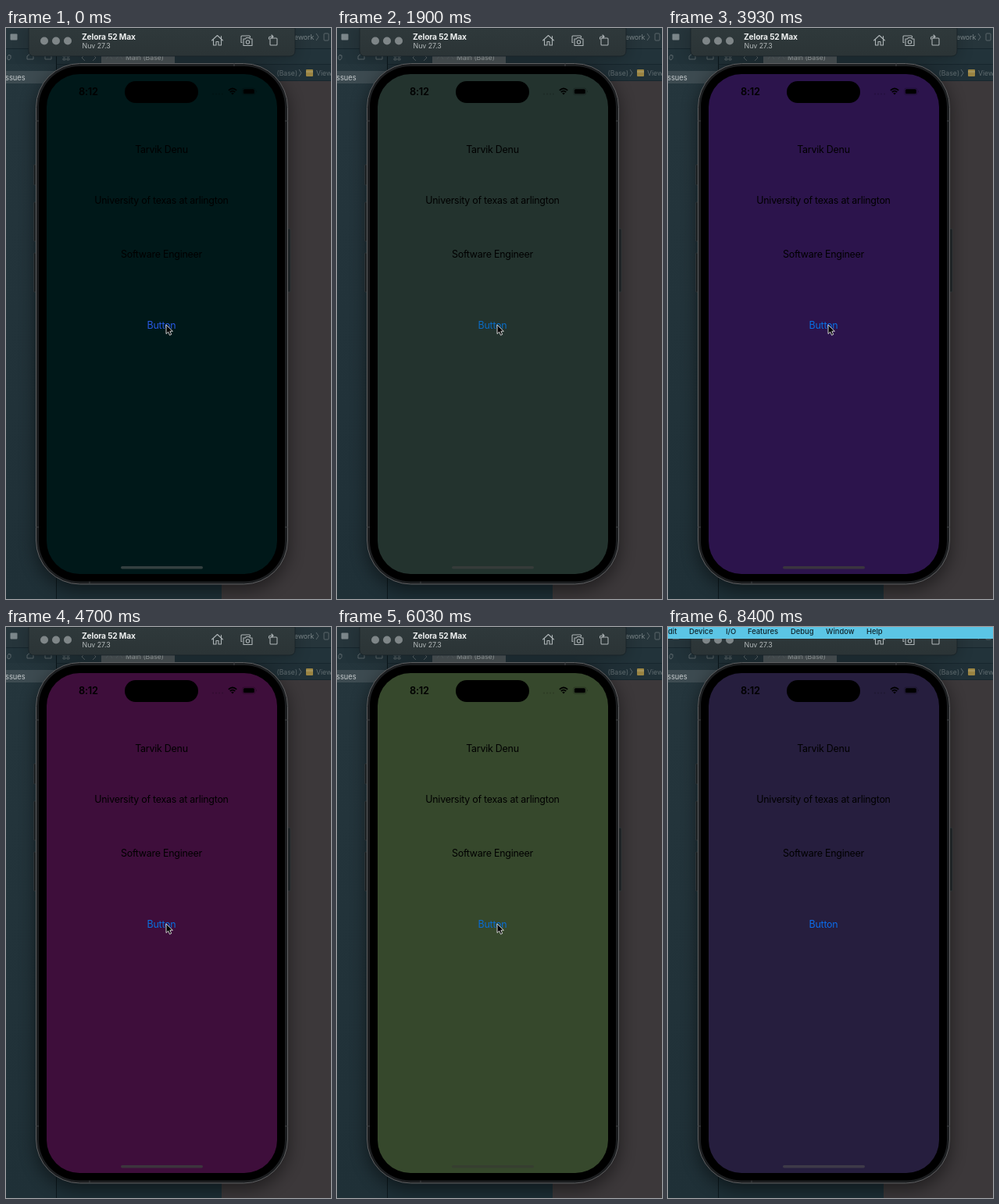
An HTML page for the animation above (8430 ms loop, 416 by 731 pixels).

```html
<!DOCTYPE html>
<html lang="en">
<head>
<meta charset="utf-8">
<title>Colour changing phone screen</title>
<style>
  html, body { margin: 0; width: 100%; height: 100%; overflow: hidden; background: #1a292f; }
  svg { display: block; width: 100vw; height: 100vh; }
  text { font-family: Inter, "Open Sans", Arial, sans-serif; }
  .label { font-size: 12.4px; letter-spacing: -.22px; text-anchor: middle; }
  .ide { font-size: 8.7px; fill: #5f6b6f; }
  .menu { font-size: 9.4px; font-weight: 500; fill: #10242b; }
  .line { fill: none; stroke: #adb4b6; stroke-width: 1.1; stroke-linejoin: round; stroke-linecap: round; }
  .dim { fill: none; stroke: #5b676b; stroke-width: 1; }
</style>
</head>
<body>
<svg viewBox="0 0 416 731" preserveAspectRatio="none">
  <defs>
    <linearGradient id="left" x2="0" y2="1">
      <stop offset="0" stop-color="#25363d"/><stop offset="1" stop-color="#1f3037"/>
    </linearGradient>
    <linearGradient id="bar" x2="0" y2="1">
      <stop offset="0" stop-color="#2f393b"/><stop offset="1" stop-color="#2b3436"/>
    </linearGradient>
    <filter id="blur" x="-20%" y="-80%" width="140%" height="260%">
      <feGaussianBlur stdDeviation="11"/>
    </filter>
  </defs>

  <!-- editor behind the simulator -->
  <rect width="416" height="731" fill="#1d2f36"/>
  <rect width="64" height="731" fill="url(#left)"/>
  <rect x="276" y="67" width="140" height="664" fill="#3c383a"/>
  <rect width="416" height="26" fill="#26353b"/>
  <rect y="26" width="416" height="20" fill="#22333a"/>
  <rect x="65" y="46" width="351" height="21" fill="#203037"/>
  <path d="M0 26.500H416M65 46.500H416M65 67.500H416" stroke="#17262d"/>
  <path d="M64.500 26V731" stroke="#0c181d"/>
  <rect y="55" width="64" height="16" fill="#3d4b51"/>
  <text x="-1" y="66.500" font-size="9.300" fill="#c5cacc">ssues</text>
  <rect x="122" y="30" width="94" height="15" fill="#50595c"/>
  <text x="153" y="40.500" class="ide" style="fill:#a9b1b3">Main (Base)</text>
  <path class="dim" d="M128 40l4-6 4 6M141 40l4-6 4 6"/>
  <rect x="5.500" y="7.500" width="9" height="8" rx="1" fill="#7c878b"/>
  <path class="dim" d="M2 40q-1-4 2-6q0 2 2 1q1 4-2 6zM27 40v-4l4-3 4 3v4zM50 34h8v6h-8zM73 34h3v3h-3zM78 34h3v3h-3zM73 39h3v2h-3zM78 39h3v2h-3zM101 34l-4 4 4 4M111 34l4 4-4 4"/>
  <text x="369" y="15" class="ide" style="fill:#7d888b">ework</text>
  <path class="dim" d="M397 7l3 4.500-3 4.500M375 53l3 4.500-3 4.500"/>
  <rect x="407" y="7" width="6" height="9" rx="1" class="dim"/>
  <text x="346.500" y="60.500" class="ide">(Base)</text>
  <rect x="384" y="53" width="9" height="9" rx="1" fill="#9a8442"/>
  <path d="M384 56h9" stroke="#b5a672"/>
  <text x="397" y="60.500" class="ide">View</text>

  <g filter="url(#blur)" opacity=".48">
    <rect x="29" y="0" width="341" height="40" rx="7" opacity=".5"/>
    <rect x="38" y="52" width="323" height="668" rx="56"/>
  </g>

  <!-- simulator title bar -->
  <path d="M29 0H370V29q0 7-7 7H36q-7 0-7-7z" fill="url(#bar)" stroke="#182326" stroke-width=".8"/>
  <g fill="#7f8688">
    <circle cx="49" cy="16.500" r="5"/><circle cx="64" cy="16.500" r="5"/><circle cx="79" cy="16.500" r="5"/>
  </g>
  <text x="97" y="15" font-size="10.200" font-weight="700" letter-spacing="-.15" fill="#eef0f0">Zelora 52 Max</text>
  <text x="97.500" y="25.500" font-size="8.800" fill="#b4babb">Nuv 27.3</text>
  <path class="line" d="M263.500 16L270.500 9.500l7 6.500M265.500 15v7h3.500v-4.500h3V22h3.500v-7M275.500 10.500v3.500"/>
  <g class="line">
    <path d="M302 18.500h-1V11q0-1 1-1h9.500q1 0 1 1v1"/>
    <path d="M304 14h2.500l1-1.500h4l1 1.500h2.500v8.500h-11z"/><circle cx="309.500" cy="18" r="2.200"/>
    <rect x="338" y="13" width="9" height="9" rx="1"/>
    <path d="M336.500 14v-1q0-2 2-2h3M340 9l2 2-2 2"/>
  </g>

  <!-- phone -->
  <g fill="#1b2022" stroke="#363b3e" stroke-width=".7">
    <rect x="35.500" y="175" width="5" height="26" rx="1"/>
    <rect x="35.500" y="223" width="5" height="50" rx="1"/>
    <rect x="35.500" y="288" width="5" height="50" rx="1"/>
    <rect x="359" y="257" width="5" height="81" rx="1"/>
  </g>
  <rect x="38.500" y="45.500" width="322" height="666.500" rx="56" fill="#1c1e20" stroke="#5f6062"/>
  <path d="M38 119h4M357 119h4M38 639h4M357 639h4M107 708v4M292 45v4" stroke="#414345"/>
  <rect x="42" y="49" width="315" height="659.500" rx="52" fill="#000"/>
  <rect id="screen" x="52" y="59" width="295" height="640" rx="42"/>
  <rect x="152" y="68" width="94" height="28" rx="14"/>
  <text x="93" y="86" font-size="12.800" font-weight="600" letter-spacing="-.2">8:12</text>
  <g opacity=".18"><circle cx="265" cy="84.500" r="1"/><circle cx="269" cy="84.500" r="1"/><circle cx="273" cy="84.500" r="1"/><circle cx="277" cy="84.500" r="1"/></g>
  <path d="M284.800 79.800q5.200-4.600 10.400 0M286.800 82q3.200-2.800 6.400 0" fill="none" stroke="#000" stroke-width="1.700"/>
  <path d="M288.200 83.600q1.800-1.500 3.600 0L290 85.600z"/>
  <rect x="302.500" y="77" width="16.500" height="8.500" rx="2.500" fill="none" stroke="#000" stroke-opacity=".28" stroke-width=".8"/>
  <rect x="303.800" y="78.300" width="14" height="6" rx="1.500"/>
  <path d="M320 80v2.600q1-.3 1-1.300t-1-1.300" opacity=".28"/>
  <text class="label" x="199" y="159.500">Tarvik Denu</text>
  <text class="label" x="199" y="225.300">University of texas at arlington</text>
  <text class="label" x="199" y="293.500">Software Engineer</text>
  <text class="label" x="199" y="384.500" id="button">Button</text>
  <rect id="home" x="147" y="689" width="105" height="3.600" rx="1.800"/>

  <g id="menu">
    <rect width="416" height="15" fill="#5bc5e5"/>
    <g class="menu">
      <text x="0" y="9">dit</text><text x="27" y="9">Device</text><text x="74" y="9">I/O</text>
      <text x="102" y="9">Features</text><text x="157" y="9">Debug</text>
      <text x="202" y="9">Window</text><text x="254" y="9">Help</text>
    </g>
  </g>
  <path id="cursor" d="M0 0V11.500L2.700 9.100 4.500 13.300 6.700 12.300 4.900 8.200H8.400z" fill="#050505" stroke="#e4e4e4" stroke-width=".9" stroke-linejoin="round"/>
</svg>
<script>
const LOOP = 8430;
const $ = id => document.getElementById(id);
const screenFill = $("screen"), button = $("button"), home = $("home"), menu = $("menu"), cursor = $("cursor");

// time, screen, home indicator, button
const tones = [
  [0,    [0, 24, 25],  [52, 64, 64], [40, 90, 228]],
  [830,  [32, 20, 64], [58, 54, 70], [8, 112, 228]],
  [2900, [38, 80, 30], [48, 64, 44], [12, 104, 170]],
  [3930, [44, 20, 76], [58, 52, 62], [8, 112, 228]],
  [5270, [76, 10, 46], [62, 54, 60], [8, 112, 220]],
  [6030, [54, 72, 44], [54, 62, 48], [8, 108, 215]],
  [8400, [38, 30, 62], [62, 58, 72], [12, 108, 235]]
];

const clamp = x => Math.max(0, Math.min(1, x));
const ease = x => x * x * (3 - 2 * x);
const span = (t, from, to) => ease(clamp((t - from) / (to - from)));
const mix = (a, b, k) => `rgb(${a.map((v, i) => Math.round(v + (b[i] - v) * k))})`;

function draw(t) {
  let i = 0;
  while (i < tones.length - 2 && t >= tones[i + 1][0]) i++;
  const [a, b] = [tones[i], tones[i + 1]];
  const k = clamp((t - a[0]) / (b[0] - a[0]));
  [screenFill, home, button].forEach((el, n) => el.setAttribute("fill", mix(a[n + 1], b[n + 1], k)));

  const lift = span(t, 6970, 7480);
  cursor.setAttribute("transform", `translate(${205 + 12 * lift} ${380 - 400 * lift})`);
  menu.setAttribute("transform", `translate(0 ${-16 * (1 - span(t, 7480, 7760))})`);
}

const start = performance.now();
function tick() {
  draw((performance.now() - start) % LOOP);
  requestAnimationFrame(tick);
}
draw(0);
requestAnimationFrame(tick);
</script>
</body>
</html>
```
